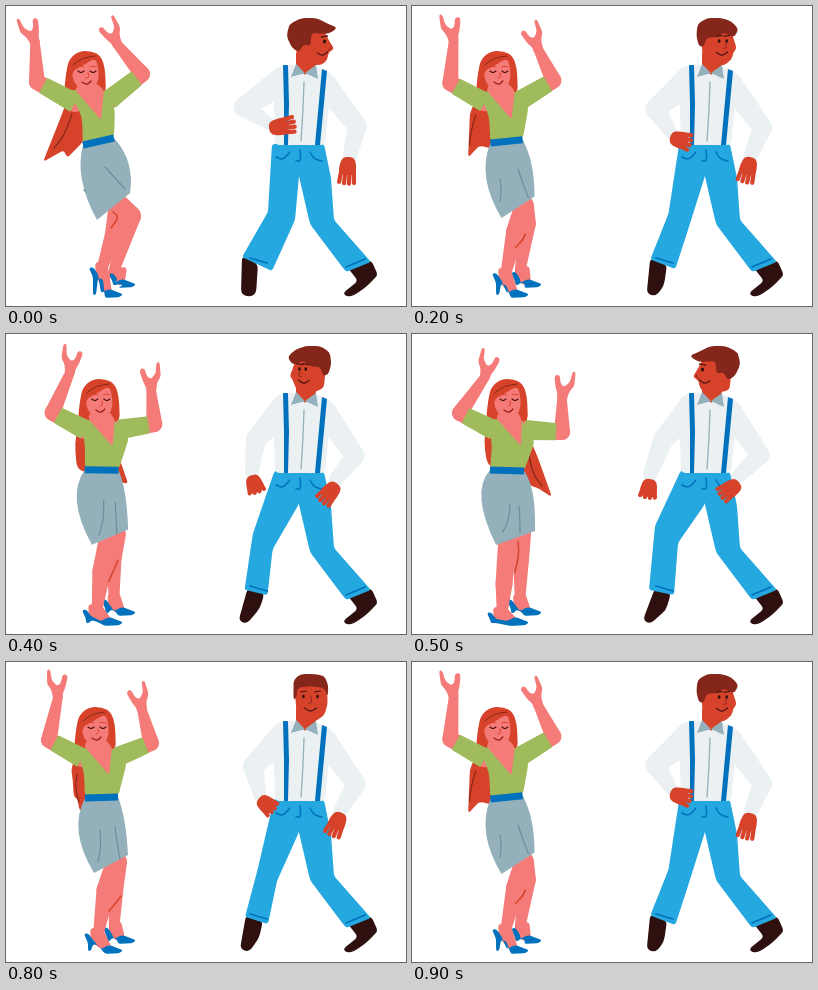
Recreate the animation shown at these times as an HTML page with a canvas. Size 400x300 px, loop 1 s.

```html
<!DOCTYPE html>
<html lang="en">
<head>
<meta charset="utf-8">
<title>Two dancers</title>
<style>
html, body { margin: 0; width: 100%; height: 100%; overflow: hidden; background: #fff; }
canvas { display: block; width: 400px; height: 300px; }
</style>
</head>
<body>
<canvas></canvas>
<script>
const canvas = document.querySelector('canvas');
const ctx = canvas.getContext('2d');
const ratio = window.devicePixelRatio || 1;
canvas.width = 400 * ratio;
canvas.height = 300 * ratio;

const PINK = '#f47b78', RED = '#d6432a', GREEN = '#9fbb5c', BLUE = '#0071bc',
  GREY = '#94b1bb', CREASE = '#6b8d98', SHIRT = '#ebf0f2', SKY = '#25a7df',
  BROWN = '#85261a', DARK = '#2e100f', INK = '#4a1512';

// How far the sway has gone, from 0 (start) to 1 (far side).
let sway = 0;

const points = source => typeof source === 'string'
  ? source.trim().split(/\s+/).map(p => p.split(',').map(Number)) : source;

// Blends matching points, weighted by the given factors.
function blend(sources, weights) {
  const sets = sources.map(points);
  return sets[0].map((p, i) => p.map((_, k) =>
    sets.reduce((sum, set, s) => sum + set[i][k] * weights[s], 0)));
}

// Each point follows a parabola through its first, middle and last place.
const at = (...keys) => blend(keys, [
  (1 - sway) * (1 - 2 * sway), 4 * sway * (1 - sway), sway * (2 * sway - 1)]);

const between = (a, b, k) => a.map((v, i) => v + (b[i] - v) * k);
const distance = (a, b) => Math.hypot(b[0] - a[0], b[1] - a[1]) || 1;
const toward = (a, b, length) => between(a, b, Math.min(0.5, length / distance(a, b)));

function fill(color) {
  ctx.fillStyle = color;
  ctx.fill();
}

// Filled polygon with softened corners.
function shape(color, source, round = 3) {
  const pts = points(source), n = pts.length;
  ctx.beginPath();
  pts.forEach((p, i) => {
    ctx.lineTo(...toward(p, pts[(i + n - 1) % n], round));
    ctx.quadraticCurveTo(...p, ...toward(p, pts[(i + 1) % n], round));
  });
  fill(color);
}

// Open line that bends softly at its inner points.
function line(color, width, source, cap = 'round') {
  const pts = points(source), last = pts.length - 1;
  ctx.beginPath();
  ctx.moveTo(...pts[0]);
  for (let i = 1; i < last; i++) {
    ctx.lineTo(...toward(pts[i], pts[i - 1], 20));
    ctx.quadraticCurveTo(...pts[i], ...toward(pts[i], pts[i + 1], 20));
  }
  ctx.lineTo(...pts[last]);
  ctx.strokeStyle = color;
  ctx.lineWidth = width;
  ctx.lineCap = cap;
  ctx.stroke();
}

// Tapered limb through joints given as x,y,radius.
function limb(color, source) {
  const joints = points(source);
  for (let i = 1; i < joints.length; i++) {
    const [x1, y1, r1] = joints[i - 1], [x2, y2, r2] = joints[i];
    const angle = Math.atan2(y2 - y1, x2 - x1);
    const lean = Math.acos((r1 - r2) / distance(joints[i - 1], joints[i]));
    ctx.beginPath();
    ctx.arc(x1, y1, r1, angle + lean, angle - lean);
    ctx.arc(x2, y2, r2, angle - lean, angle + lean);
    fill(color);
  }
}

function placed(x, y, degrees, flip, draw) {
  ctx.save();
  ctx.translate(x, y);
  ctx.rotate(degrees * Math.PI / 180);
  ctx.scale(flip, 1);
  draw();
  ctx.restore();
}

function herArm(shoulder, elbow, [x, y, angle], flip) {
  limb(PINK, [[x, y, 4.7], [...elbow, 8], [...shoulder, 9]]);
  placed(x, y, angle, flip, () => shape(PINK,
    '-4.7,3 -6,-7 -10,-14 -9,-28 -6,-28 -5,-17 0,-11 4,-14 6,-22 10,-22 11,-19 8,-9 5,-3 4.7,3', 2.5));
  // The sleeve stops just short of the elbow.
  const end = between(shoulder, elbow, .84), length = distance(shoulder, elbow);
  const side = [(shoulder[1] - elbow[1]) / length, (elbow[0] - shoulder[0]) / length];
  const edge = (p, width) => p.map((v, i) => v + side[i] * width);
  shape(GREEN, [edge(shoulder, -10), edge(end, -8.5), edge(end, 8.5), edge(shoulder, 10)], 1);
}

function herShoe([hx, hy], tx, ty) {
  shape(PINK, [[hx + 6, hy - 6], [hx + 18, hy - 7], [tx - 11, ty - 4], [tx - 17, ty], [hx + 7, hy + 8]], 4);
  shape(BLUE, [[hx, hy], [hx + 4, hy - 1], [hx + 9, hy + 6], [tx - 22, ty - 3], [tx - 14, ty - 7],
    [tx, ty - 2], [tx - 3, ty + 1], [tx - 18, ty + 2], [hx + 14, hy + 11], [hx + 9, hy + 10],
    [hx + 7, ty - 1], [hx + 4, ty - 1], [hx + 4, hy + 9]], 2.5);
}

function herFace() {
  shape(PINK, '-14,-2 -2,-8 9,-15 12,-7 13,6 9,14 1,18 -7,15 -13,8', 6);
  line(BROWN, 1, '-13,-8 -4,-15 9,-17');
  for (const x of [-5, 7]) {
    line(INK, 1.2, [[x - 3, -2], [x, 0], [x + 3, -2]]);
    line(RED, 1, [[x - 3, -6], [x, -7], [x + 3, -6]]);
  }
  line(RED, 1, '2,0 3,4 0,5');
  line('#8b1e1c', 1.2, '-4,9 1,12 5,8');
}

function drawHer() {
  const [waistLeft, waistRight] = at('77,139 108,132', '79,136 112,135', '78,136 112,137');
  const [head] = at('80,67', '90,67', '96,67');

  shape(RED, at('66,80 56,108 37,156 58,144 61,152 77,136 84,95',
    '74,80 65,108 74,150 80,140 100,142 100,130 95,95',
    '84,90 98,112 118,152 124,153 140,163 126,124 112,90'), 4);
  shape(RED, at('70,80 64,100 70,130 82,130 84,95', '72,80 66,108 68,138 84,140 90,95',
    '76,80 72,108 75,130 84,136 90,90'), 8);
  line(BROWN, 1.2, at('66,108 58,130 48,142', '71,112 69,126 73,140', '117,122 121,140 130,152'));

  const [backHeel, frontHeel] = at('103,268 83,262', '97,266 78,272', '95,266 75,279');
  limb(PINK, at('112,199,11 125,210,10 107,268,5', '110,200,11 110,222,8 108,268,5',
    '109,200,10 109,225,8 108,268,5'));
  herShoe(backHeel, 130, 280);
  limb(PINK, at('112,205,10 107,228,8 95,266,5', '108,206,10 100,228,9.5 92,274,5',
    '95,210,9 92,250,8.5 90,281,5'));
  herShoe(frontHeel, 117, 290);
  line(RED, 1.5, at('107,206 113,211 105,222', '115,234 109,242 103,249', '106,208 107,220 103,238'));

  const [hipLeft, hemLeft, hemRight, hipRight] = at('68,172 91,214 124,187 129,155',
    '62,168 88,211 122,193 120,155', '58,158 84,211 123,197 124,152');
  ctx.beginPath();
  ctx.moveTo(...waistLeft);
  ctx.quadraticCurveTo(...hipLeft, ...hemLeft);
  ctx.lineTo(...hemRight);
  ctx.quadraticCurveTo(...hipRight, ...waistRight);
  fill(GREY);
  line(CREASE, 1.2, at('99,161 109,172 119,183', '109,165 111,180 114,197', '107,172 108,185 108,199'));
  line(CREASE, 1.2, at('78,184 79,185 80,186', '94,168 95,185 92,200', '98,170 97,185 91,198'));

  placed(...head, 0, 1, () =>
    shape(RED, '-22,20 -20,0 -17,-14 -7,-22 6,-22 15,-17 19,-5 20,20 10,28 -12,28', 7));
  const [shoulderLeft, elbowLeft, shoulderRight, elbowRight] = at('69,97 31,76 103,94 136,68',
    '76,96 43,78 111,95 145,81', '82,96 48,79 113,96 150,98');
  const [handLeft, handRight] = at('29,36,-22 111,38,-25', '52,35,-4 136,48,-13', '73,43,12 150,64,10');
  herArm(shoulderLeft, elbowLeft, handLeft, 1);
  herArm(shoulderRight, elbowRight, handRight, -1);
  shape(GREEN, [...at('76,111 63,84 99,84 109,102', '78,110 70,86 107,86 121,100',
    '80,111 76,85 110,86 123,107'), waistRight, waistLeft], 6);
  shape(PINK, at('69,84 73,77 90,77 98,84 95,114', '78,84 82,77 99,77 106,85 103,113',
    '84,84 88,77 105,77 110,86 109,112'), 3);
  line(BLUE, 7, [waistLeft, waistRight], 'butt');
  placed(...head, 0, 1, herFace);
}

// Palm with four fingers fanned about its direction.
function hisHand([[x, y], [degrees, length]]) {
  placed(x, y, degrees, 1, () => {
    shape(RED, '-9,-6 3,-9 9,-7 9,8 1,9 -9,6', 5);
    for (let i = -1.5; i < 2; i++) {
      line(RED, 4.2, [[2, i * 4], [length - Math.abs(i), i * 5]]);
    }
  });
}

function hisHead() {
  const turn = 1 - 2 * sway, profile = Math.abs(turn);
  const turned = (front, side) => blend([front, side], [1 - profile, profile]);
  placed(304.5, 38, 0, Math.sign(turn) || 1, () => {
    shape(RED, turned('-16,-16 15,-18 17,-4 17,4 16,8 14,15 4,22 -4,21 -14,13',
      '-16,-12 12,-17 18,-4 24,5 18,8 17,16 11,21 -1,21 -13,18'), 4);
    shape(BROWN, turned('-17,-8 -17,-20 -10,-26 4,-26 14,-24 18,-14 17,-3 14,-12 -1,-14 -13,-12 -14,-2 -17,0',
      '-24,-8 -21,-20 -9,-26 6,-26 16,-21 27,-16 18,-10 1,-11 0,2 -7,0 -11,8 -18,5'), 4);
    for (const [x, y] of turned('-7,-4 7,-4', '14,-3 14,-3')) {
      line(DARK, 2.4, [[x, y], [x, y + 1]]);
      line(INK, 1.2, [[x - 3, y - 4], [x + 3, y - 5]]);
    }
    line(BROWN, 1, turned('0,-4 2,3 -2,3', '20,3 20,5 18,6'));
    line(INK, 1.3, turned('-6,8 0,12 6,8', '7,9 12,12 17,8'));
  });
}

function drawHis() {
  shape(DARK, at('236,250 252,258 250,288 243,291 235,288', '240,253 257,259 253,276 243,290 234,287',
    '243,254 259,259 254,276 238,290 231,286'), 5);
  shape(DARK, '342,262 365,254 372,269 361,280 349,289 341,291 337,287 352,275', 4);
  shape(SKY, '288,138 318,138 325,172 328,214 365,256 340,266 304,218 292,166', 3);
  shape(SKY, at('266,138 295,138 293,170 289,214 266,265 236,251 262,206',
    '268,137 296,138 293,170 271,219 262,262 239,255 252,206',
    '269,136 296,138 293,170 266,209 262,261 237,256 243,192'), 3);
  line(BLUE, 1.8, '244,252 261,257');
  line(BLUE, 1.8, '340,261 359,253');
  line(BLUE, 1.5, '270,151 277,154 284,146');
  line(BLUE, 1.5, '294,144 295,155 290,155');
  line(BLUE, 1.5, '304,146 308,153 316,155');

  limb(SHIRT, at('278,74,14 238,101,10 264,118,6', '278,74,14 247,104,10 254,133,6.5',
    '278,76,14 251,106,10 238,141,7'));
  limb(SHIRT, at('319,79,12 351,120,9.5 344,150,7', '319,79,12 350,122,9.5 334,149,7',
    '319,79,12 348,121,9.5 326,143,7'));
  shape(SHIRT, '267,66 274,60 289,58 299,67 311,60 326,68 319,139 269,139', 5);
  line(GREY, 1.3, '298,76 297,105 295,135');
  shape(BLUE, '277,59 282,59 283,98 282,139 278,139 278,98', .5);
  shape(BLUE, '316,63 321,65 314,139 309,139', .5);
  shape(RED, '290,46 312,48 309,62 299,69 290,62', 2);
  shape(GREY, '290,58 285,71 299,67', .5);
  shape(GREY, '310,59 299,67 312,73', .5);
  hisHand(at('272,121 -10,17', '260,142 40,10', '237,154 100,10'));
  hisHand(at('342,160 95,18', '332,159 115,16', '320,154 145,14'));
  hisHead();
}

// The dance holds at both ends and snaps through three steps between.
const steps = [0, .27, .5, .78, 1];

function frame(now) {
  const beat = Math.floor(now % 1000 / 100);
  const step = beat < 6 ? Math.max(0, beat - 1) : 10 - beat;
  sway = steps[Math.min(step, 4)];
  ctx.setTransform(ratio, 0, 0, ratio, 0, 0);
  ctx.fillStyle = '#fff';
  ctx.fillRect(0, 0, 400, 300);
  drawHer();
  drawHis();
  requestAnimationFrame(frame);
}
frame(0);
</script>
</body>
</html>
```
